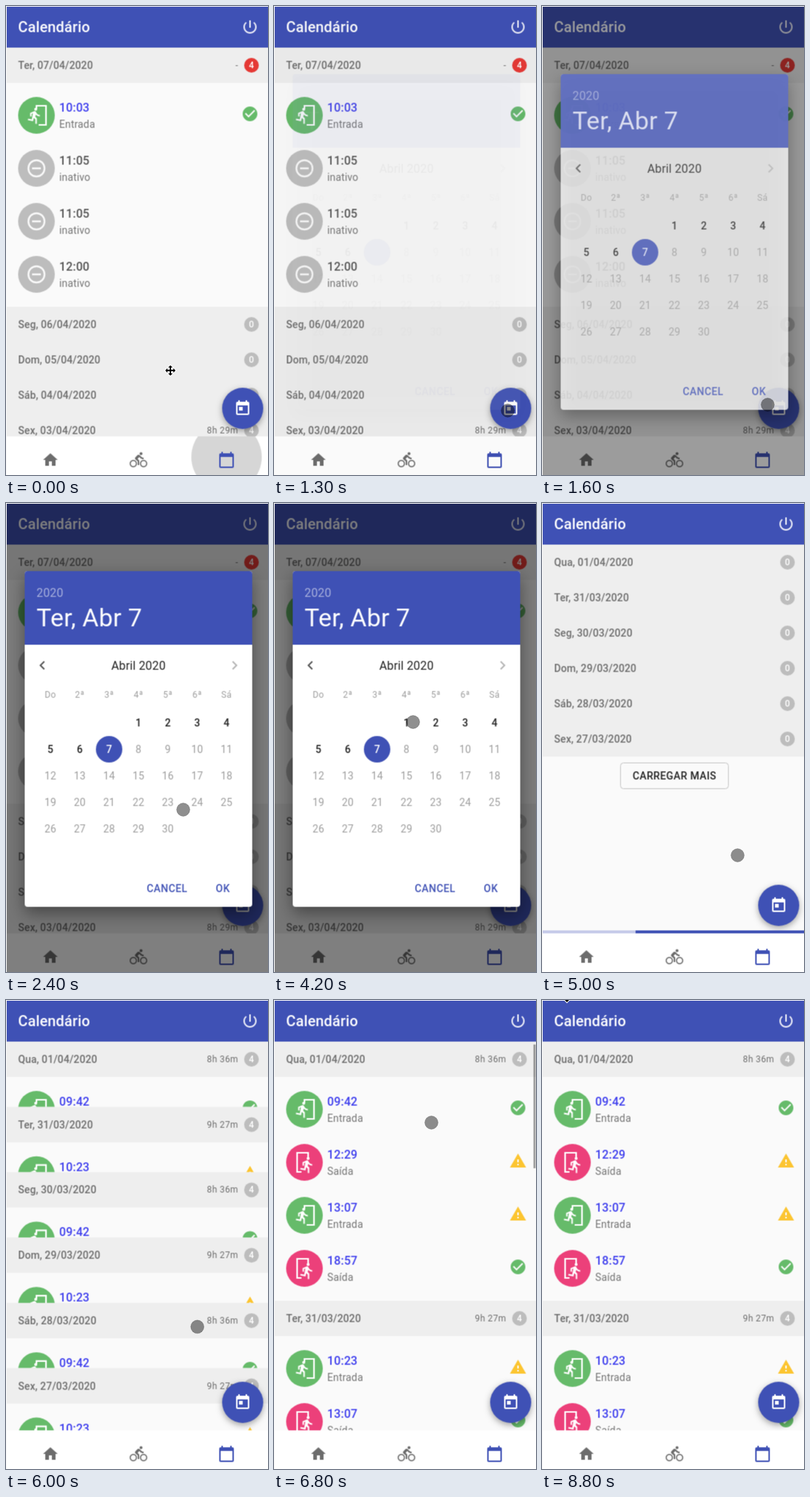
An HTML page with a canvas for the animation above (8.9 s loop, 357 by 637 pixels).

```html
<!DOCTYPE html>
<html lang="pt">
<head>
<meta charset="utf-8">
<title>Calendário</title>
<style>
html, body { margin: 0; width: 100%; height: 100%; overflow: hidden; background: #fafafa; }
canvas { display: block; }
</style>
</head>
<body>
<canvas id="stage" width="357" height="637"></canvas>
<script>
const LOOP = 8900, STEP = 100, W = 357, H = 637, NAV = 584;
const BLUE = '#3f51b5', GREEN = '#66bb6a', PINK = '#ec407a', GREY = '#bdbdbd', TEXT = '#6d6d6d';

// The app is painted on its own layer, shown half a pixel off the grid; cursors stay sharp on top
const screen2d = document.getElementById('stage').getContext('2d');
const layer = document.createElement('canvas');
layer.width = W;
layer.height = H;
const app2d = layer.getContext('2d');
let ctx = app2d;

const icons = {
  power: 'M13 3h-2v10h2V3zm4.83 2.17l-1.42 1.42C17.99 7.86 19 9.81 19 12c0 3.87-3.13 7-7 7s-7-3.13-7-7c0-2.19 1.01-4.14 2.58-5.42L6.17 5.17C4.23 6.82 3 9.26 3 12c0 4.97 4.03 9 9 9s9-4.03 9-9c0-2.74-1.23-5.18-3.17-6.83z',
  home: 'M10 20v-6h4v6h5v-8h3L12 3 2 12h3v8z',
  bike: 'M15.5 5.5c1.1 0 2-.9 2-2s-.9-2-2-2-2 .9-2 2 .9 2 2 2zM5 12c-2.8 0-5 2.2-5 5s2.2 5 5 5 5-2.2 5-5-2.2-5-5-5zm0 8.5c-1.9 0-3.5-1.6-3.5-3.5s1.6-3.5 3.5-3.5 3.5 1.6 3.5 3.5-1.6 3.5-3.5 3.5zm5.8-10l2.4-2.4.8.8c1.3 1.3 3 2.1 5.1 2.1V9c-1.5 0-2.7-.6-3.6-1.5l-1.9-1.9c-.5-.4-1-.6-1.6-.6s-1.1.2-1.4.6L7.8 8.4c-.4.4-.6.9-.6 1.4 0 .6.2 1.1.6 1.4L11 14v5h2v-6.2l-2.2-2.3zM19 12c-2.8 0-5 2.2-5 5s2.2 5 5 5 5-2.2 5-5-2.2-5-5-5zm0 8.5c-1.9 0-3.5-1.6-3.5-3.5s1.6-3.5 3.5-3.5 3.5 1.6 3.5 3.5-1.6 3.5-3.5 3.5z',
  calendar: 'M20 3h-1V1h-2v2H7V1H5v2H4c-1.1 0-2 .9-2 2v16c0 1.1.9 2 2 2h16c1.1 0 2-.9 2-2V5c0-1.1-.9-2-2-2zm0 18H4V8h16v13z',
  today: 'M19 3h-1V1h-2v2H8V1H6v2H5c-1.11 0-1.99.9-1.99 2L3 19c0 1.1.89 2 2 2h14c1.1 0 2-.9 2-2V5c0-1.1-.9-2-2-2zm0 16H5V8h14v11zM7 10h5v5H7z',
  check: 'M12 2C6.48 2 2 6.48 2 12s4.48 10 10 10 10-4.48 10-10S17.52 2 12 2zm-2 15l-5-5 1.41-1.41L10 14.17l7.59-7.59L19 8l-9 9z',
  warning: 'M1 21h22L12 2 1 21zm12-3h-2v-2h2v2zm0-4h-2v-4h2v4z',
  left: 'M15.41 7.41L14 6l-6 6 6 6 1.41-1.41L10.83 12z',
  right: 'M10 6L8.59 7.41 13.17 12l-4.58 4.59L10 18l6-6z',
  runner: 'M13.34 8.17a1.69 1.69 0 1 1 0-3.39a1.69 1.69 0 0 1 0 3.39M10.3 19.93L4.37 18.75 4.71 17.05 8.86 17.9 10.21 11.04 8.69 11.64V14.5H7V10.54L11.4 8.67 12.07 8.59C12.67 8.59 13.17 8.93 13.5 9.44L14.36 10.79C15.04 12 16.39 12.82 18 12.82V14.5C16.14 14.5 14.44 13.67 13.34 12.4L12.84 14.94 14.61 16.63V23H12.92V17.9L11.14 16.21Z',
  move: 'M-7 0L-4-3V-1H-1V-4H-3L0-7 3-4H1V-1H4V-3L7 0 4 3V1H1V4H3L0 7-3 4H-1V1H-4V3Z'
};
for (const name in icons) icons[name] = new Path2D(icons[name]);

// Waypoints: time, x, y
const crossPath = [[0, 224, 495], [900, 328, 553], [1000, 328, 555]];
const touchPath = [
  [1300, 318, 549], [1600, 307, 541], [2000, 322, 549], [2100, 322, 549], [2400, 241, 416],
  [2900, 241, 416], [3400, 181, 330], [3700, 188, 296], [3800, 188, 296], [3900, 216, 296],
  [4000, 191, 298], [4100, 191, 298], [4200, 189, 297], [4900, 189, 297], [5000, 266, 478],
  [5900, 266, 478], [6800, 214, 166], [7200, 50, 150], [7700, 340, 366], [7800, 347, 410],
  [8100, 316, 560]
];

const clamp = x => Math.max(0, Math.min(1, x));

// Material standard curve, cubic-bezier(.4, 0, .2, 1)
function ease(x) {
  x = clamp(x);
  let lo = 0, hi = 1;
  for (let i = 0; i < 20; i++) {
    const u = (lo + hi) / 2, v = 1 - u;
    if (1.2 * u * v * v + .6 * u * u * v + u ** 3 < x) lo = u; else hi = u;
  }
  return lo * lo * (3 - 2 * lo);
}

function along(path, t) {
  const i = path.findIndex(p => p[0] >= t);
  if (i <= 0) return (i ? path[path.length - 1] : path[0]).slice(1);
  const [t0, x0, y0] = path[i - 1], [t1, x1, y1] = path[i];
  const k = (t - t0) / (t1 - t0);
  return [x0 + (x1 - x0) * k, y0 + (y1 - y0) * k];
}

function rect(x, y, w, h, color) {
  ctx.fillStyle = color;
  ctx.fillRect(x, y, w, h);
}

function circle(x, y, r, color) {
  ctx.fillStyle = color;
  ctx.beginPath();
  ctx.arc(x, y, r, 0, 7);
  ctx.fill();
}

function text(str, x, y, size, color, { weight = 400, align = 'left', spacing = 0 } = {}) {
  ctx.font = `${weight} ${size}px Roboto, sans-serif`;
  ctx.letterSpacing = spacing * size + 'px';
  ctx.textAlign = align;
  ctx.fillStyle = color;
  ctx.fillText(str, x, y);
}

function icon(name, x, y, color, scale = 1) {
  ctx.save();
  ctx.translate(x, y);
  ctx.scale(scale, scale);
  ctx.fillStyle = color;
  ctx.fill(icons[name]);
  ctx.restore();
}

function shadowed(blur, dy, alpha, draw) {
  ctx.save();
  ctx.shadowColor = `rgba(0,0,0,${alpha})`;
  ctx.shadowBlur = blur;
  ctx.shadowOffsetY = dy;
  draw();
  ctx.restore();
}

function strokePath(d, color, width) {
  ctx.strokeStyle = color;
  ctx.lineWidth = width;
  ctx.stroke(new Path2D(d));
}

function drawItem([time, kind, status], y) {
  const idle = kind === 'inativo';
  circle(41, y, 25, idle ? GREY : kind === 'Entrada' ? GREEN : PINK);
  ctx.save();
  ctx.translate(41, y);
  if (idle) {
    strokePath('M11 0A11 11 0 1 1-11 0A11 11 0 1 1 11 0M-6 0H6', '#fafafa', 2.4);
  } else if (kind === 'Entrada') {
    strokePath('M0-9V-13H13V13H3', '#fff', 2.2);
    icon('runner', -17, -16, '#fff', 1.2);
  } else {
    strokePath('M5-6V-13H-10V13H-4', '#fff', 2.2);
    icon('runner', -11, -13, '#fff', 1.2);
  }
  ctx.restore();
  text(time, 72, y - 5, 16, idle ? '#555' : '#3f3fee', { weight: 500, spacing: .00938 });
  text(kind, 72, y + 17, 14, '#757575', { spacing: .01071 });
  if (status) icon(status, 320, y - 14, status === 'check' ? GREEN : '#fcc531');
}

function drawDay(y, label, total, count, color = GREY) {
  rect(0, y, W, 48, '#eee');
  text(label, 16, y + 29, 14, TEXT, { weight: 500, spacing: .00714 });
  text(total, 316, y + 28, 12, TEXT, { align: 'right', spacing: .0333 });
  circle(334, y + 24, 10, color);
  text(count, 334, y + 28, 12, '#fff', { weight: 500, align: 'center' });
}

const todayItems = [['10:03', 'Entrada', 'check'], ['11:05', 'inativo'], ['11:05', 'inativo'], ['12:00', 'inativo']];

function drawFirstList() {
  drawDay(56, 'Ter, 07/04/2020', '-', 4, '#e53935');
  todayItems.forEach((item, i) => drawItem(item, 148 + 72 * i));
  ['Seg, 06', 'Dom, 05', 'Sáb, 04', 'Sex, 03'].forEach((day, i) =>
    drawDay(408 + 48 * i, day + '/04/2020', i === 3 ? '8h 29m' : '', i === 3 ? 4 : 0));
}

const pastDays = ['Qua, 01/04', 'Ter, 31/03', 'Seg, 30/03', 'Dom, 29/03', 'Sáb, 28/03', 'Sex, 27/03'];
const pastItems = [
  [['09:42', 'Entrada', 'check'], ['12:29', 'Saída', 'warning'], ['13:07', 'Entrada', 'warning'], ['18:57', 'Saída', 'check']],
  [['10:23', 'Entrada', 'warning'], ['13:07', 'Saída', 'check'], ['14:02', 'Entrada', 'check'], ['19:24', 'Saída', 'check']]
];

function drawPastList(open) {
  const body = 304 * open;
  let y = 56;
  pastDays.forEach((day, i) => {
    const loaded = open > 0;
    drawDay(y, day + '/2020', loaded ? ['8h 36m', '9h 27m'][i % 2] : '', loaded ? 4 : 0);
    y += 48;
    if (loaded) {
      ctx.save();
      ctx.beginPath();
      ctx.rect(0, y, W, body);
      ctx.clip();
      pastItems[i % 2].forEach((item, j) => drawItem(item, y + 44 + 72 * j));
      ctx.restore();
    }
    y += body;
  });
  ctx.strokeStyle = '#c4c4c4';
  ctx.lineWidth = 1;
  ctx.beginPath();
  ctx.roundRect(106.5, y + 8.5, 147, 35, 4);
  ctx.stroke();
  text('CARREGAR MAIS', 180, y + 31, 14, '#212121', { weight: 500, align: 'center', spacing: .02857 });
}

function drawFrame(t) {
  rect(0, 0, W, 56, BLUE);
  text('Calendário', 16, 35, 20, '#fff', { weight: 500, spacing: .0075 });
  icon('power', 320, 16, '#f0f1fa');
  shadowed(8, 3, .35, () => circle(322, 546, 28, BLUE));
  icon('today', 310, 534, '#fff');

  rect(0, NAV, W, H - NAV, '#fff');
  const ripple = clamp(1 - t / 500);
  ctx.save();
  ctx.beginPath();
  ctx.rect(0, NAV, W, H - NAV);
  ctx.clip();
  circle(300, 612, 48, `rgba(0,0,0,${.16 * ripple})`);
  ctx.restore();
  icon('home', 48, 604, TEXT);
  icon('bike', 168, 604, TEXT);
  icon('calendar', 288, 604, BLUE);
}

function drawProgress(t) {
  const [x, w] = t < 5600 ? [127, 230] : [0, 150];
  rect(0, 580, W, 4, '#c5cae9');
  rect(x, 580, w, 4, BLUE);
}

function drawDialog(alpha, title, selected) {
  const center = { align: 'center', spacing: .01071 }, bold = { ...center, weight: 500 };
  const button = { ...bold, spacing: .02857 };
  ctx.save();
  ctx.globalAlpha = alpha;
  rect(0, 0, W, H, 'rgba(0,0,0,.5)');
  ctx.beginPath();
  ctx.roundRect(25, 92, 310, 456, 4);
  ctx.fillStyle = '#fff';
  shadowed(22, 9, .4, () => ctx.fill());
  ctx.beginPath();
  ctx.roundRect(25, 92, 310, 100, [4, 4, 0, 0]);
  ctx.fillStyle = BLUE;
  ctx.fill();
  text('2020', 41, 127, 16, 'rgba(255,255,255,.54)', { spacing: .00938 });
  text(title, 41, 167, 34, '#fff', { spacing: .00735 });
  icon('left', 37, 208, '#555');
  icon('right', 299, 208, '#b5b5b5');
  text('Abril 2020', 180, 226, 16, '#212121', { align: 'center', spacing: .00938 });
  ['Do', '2ª', '3ª', '4ª', '5ª', '6ª', 'Sá'].forEach((name, i) =>
    text(name, 60 + 40 * i, 264, 12, '#9e9e9e', { align: 'center', spacing: .0333 }));
  for (let day = 1; day <= 30; day++) {
    const cell = day + 2, x = 60 + 40 * (cell % 7), y = 298 + 36 * Math.floor(cell / 7);
    if (day === selected) circle(x, y, 18, BLUE);
    text(day, x, y + 5, 14, day === selected ? '#fff' : day <= 7 ? '#212121' : '#9e9e9e', day <= 7 ? bold : center);
  }
  text('CANCEL', 219, 528, 14, BLUE, button);
  text('OK', 295, 528, 14, BLUE, button);
  ctx.restore();
}

function drawCross(x, y) {
  ctx.save();
  ctx.translate(x, y);
  ctx.strokeStyle = '#fff';
  ctx.lineWidth = 2;
  ctx.stroke(icons.move);
  ctx.fillStyle = '#000';
  ctx.fill(icons.move);
  ctx.restore();
}

function drawTouch(x, y) {
  circle(x + .5, y + .5, 9, 'rgba(0,0,0,.44)');
  ctx.strokeStyle = 'rgba(0,0,0,.2)';
  ctx.lineWidth = 1;
  ctx.stroke();
}

function drawApp(t) {
  rect(0, 0, W, H, '#fafafa');
  if (t < 5000) drawFirstList();
  else drawPastList(ease((t - 5900) / 500));
  drawFrame(t);
  if (t >= 5000 && t < 6000) drawProgress(t);

  if (t >= 4500 && t < 5000) drawDialog(.75, 'Qua, Abr 1', 1);
  else if (t >= 1300 && t < 4500) drawDialog(ease((t - 1200) / 800), 'Ter, Abr 7', 7);

  if (t >= 6400) rect(353, 60, 3, 168, `rgba(0,0,0,${.36 * clamp((7200 - t) / 300)})`);
}

function draw(t) {
  ctx = app2d;
  drawApp(t);

  ctx = screen2d;
  rect(0, 0, W, H, '#fafafa');
  ctx.drawImage(layer, .5, .5);
  if (t < 1300) drawCross(...along(crossPath, t));
  else if (t < 8300) drawTouch(...along(touchPath, t));
  else if (t >= 8800) drawCross(34, -4);
}

function tick() {
  const t = performance.now() % LOOP;
  draw(Math.floor(t / STEP) * STEP);
  requestAnimationFrame(tick);
}
tick();
</script>
</body>
</html>
```
